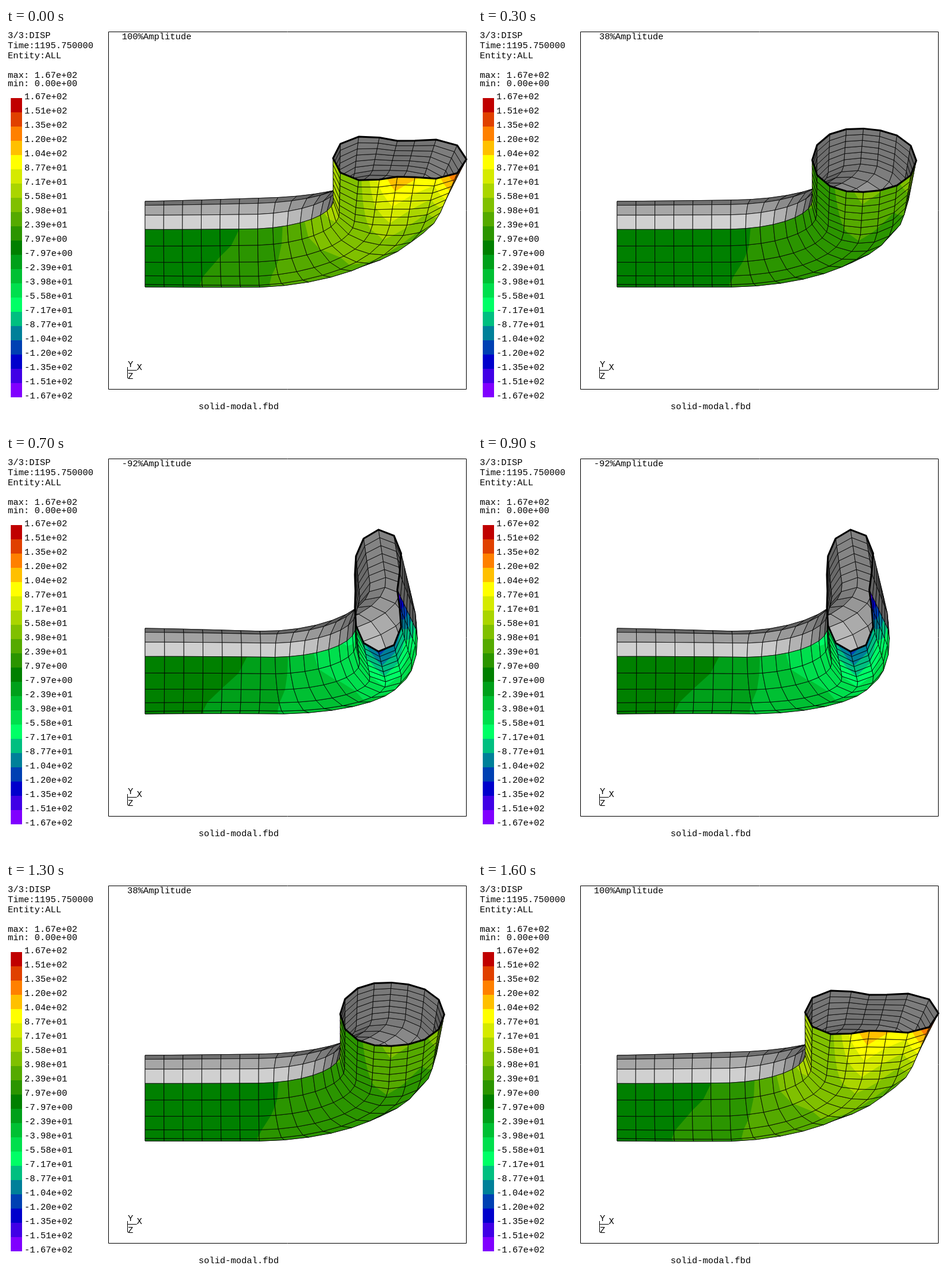
Animation of 784 by 672 pixels, one loop 1.7 s. Source, as an HTML page with a canvas:

```html
<!DOCTYPE html>
<html lang="en">
<head>
<meta charset="utf-8">
<title>Modal shape</title>
<style>
  html, body { margin: 0; width: 100%; height: 100%; overflow: hidden; background: #fff; }
  canvas { display: block; }
</style>
</head>
<body>
<canvas id="stage" width="784" height="672"></canvas>
<script>
const ctx = document.getElementById('stage').getContext('2d');
const { PI, sin, cos, hypot, abs, floor, round } = Math;

const MAX = 167.35, BANDS = 21, STEP = 2 * MAX / BANDS;
const UNITS_PER_PX = 2.65;
const TILT = 20 * PI / 180, ST = sin(TILT), CT = cos(TILT);
const R = 72.2, BEND = 216, LEG = 192, X0 = 234, AXIS_Y = 364;
const AROUND = 16, LEG_SEGS = 6, BEND_SEGS = 9;
const RINGS = 2 * LEG_SEGS + BEND_SEGS;
// rotation of the cross-section where the bend starts and ends
const ROT0 = 0.08, ROT1 = -0.072, ROT_RATE = (ROT0 - ROT1) / (PI / 2);

const STOPS = [
  [0, 192, 0, 0], [2, 255, 128, 0], [4, 255, 255, 0], [10, 0, 128, 0],
  [14, 0, 255, 102], [18, 0, 0, 204], [20, 128, 0, 255]
];
function bandColor(i) {
  const k = Math.max(1, STOPS.findIndex(s => s[0] >= i));
  const a = STOPS[k - 1], b = STOPS[k], f = (i - a[0]) / (b[0] - a[0]);
  return `rgb(${[1, 2, 3].map(c => round(a[c] + (b[c] - a[c]) * f))})`;
}
// palette[0] is the top of the legend
const palette = Array.from({ length: BANDS }, (_, i) => bandColor(i));

// Centre line, its displacement, and the amount of ovalling at one ring.
function section(i) {
  if (i <= LEG_SEGS) {
    const f = i / LEG_SEGS, w = 7 * f ** 1.5;
    return { x: X0 + LEG * f, w: 0, th: 0, dx: 0, dw: w,
             rot: 0.07 * f ** 0.7, oval: -4 * f, tri: 0 };
  }
  const bend = Math.min((i - LEG_SEGS) / BEND_SEGS, 1), th = bend * PI / 2;
  const s = sin(th), c = cos(th);
  const out = {
    x: X0 + LEG + BEND * s, w: BEND * (1 - c), th,
    dx: -BEND * (ROT0 * (1 - c) - ROT_RATE * (s - th * c)),
    dw: 7 + BEND * (ROT0 * s - ROT_RATE * (th * s + c - 1)),
    rot: ROT0 - ROT_RATE * th,
    oval: -4 + 27 * bend ** 1.5, tri: 0
  };
  const f = (i - LEG_SEGS - BEND_SEGS) / LEG_SEGS;
  if (f > 0) {
    out.w += LEG * f;
    out.dx -= ROT1 * LEG * f;
    out.oval += 17 * f;
    out.tri = 3 * f;
  }
  return out;
}

function project(x, u, w) {
  return [x, -(CT * u + ST * w), CT * w - ST * u];
}

function node(i, j) {
  const c = section(i), phi = 2 * PI * j / AROUND;
  const ox = sin(c.th), ow = -cos(c.th);
  const q = R * cos(phi);
  const rad = c.oval * cos(2 * phi) + c.tri * cos(3 * phi);
  const tan = -c.oval / 2 * sin(2 * phi) - c.tri / 3 * sin(3 * phi);
  const inPlane = rad * cos(phi) - tan * sin(phi);
  const du = rad * sin(phi) + tan * cos(phi);
  const dx = c.dx + inPlane * ox - 0.5 * c.rot * q * ow;
  const dw = c.dw + inPlane * ow + 0.5 * c.rot * q * ox;
  return {
    p: project(c.x + q * ox, R * sin(phi), c.w + q * ow),
    d: project(dx, du, dw),
    val: UNITS_PER_PX * hypot(dx, du, dw)
  };
}

const mesh = Array.from({ length: RINGS + 1 }, (_, i) =>
  Array.from({ length: AROUND }, (_, j) => node(i, j)));

function pose(n, a) {
  return {
    x: n.p[0] + a * n.d[0],
    y: AXIS_Y + n.p[1] + a * n.d[1],
    z: n.p[2] + a * n.d[2],
    v: a * n.val
  };
}

function trace(pts) {
  ctx.beginPath();
  pts.forEach(p => ctx.lineTo(p.x, p.y));
  ctx.closePath();
}

// Part of a polygon whose value is at least t.
function above(pts, t) {
  const res = [];
  pts.forEach((p, k) => {
    const q = pts[(k + 1) % pts.length];
    if (p.v >= t) res.push(p);
    if ((p.v >= t) !== (q.v >= t)) {
      const f = (t - p.v) / (q.v - p.v);
      res.push({ x: p.x + (q.x - p.x) * f, y: p.y + (q.y - p.y) * f, v: t });
    }
  });
  return res;
}

const level = v => Math.max(0, Math.min(BANDS - 1, floor((v + MAX) / STEP)));

function fillBands(pts) {
  const vals = pts.map(p => p.v);
  const lo = level(Math.min(...vals)), hi = level(Math.max(...vals));
  for (let b = lo; b <= hi; b++) {
    trace(b === lo ? pts : above(pts, -MAX + b * STEP));
    ctx.fillStyle = palette[BANDS - 1 - b];
    ctx.fill();
  }
}

function makeFace(pts, j) {
  const [A, B, C, D] = pts;
  const ax = C.x - A.x, ay = C.y - A.y, az = C.z - A.z;
  const bx = D.x - B.x, by = D.y - B.y, bz = D.z - B.z;
  const nx = ay * bz - az * by, ny = az * bx - ax * bz, nz = ax * by - ay * bx;
  return {
    pts,
    depth: A.z + B.z + C.z + D.z,
    colored: nz > 0 && j >= AROUND / 2,
    gray: round(71 + 160 * abs(nz) / hypot(nx, ny, nz))
  };
}

function drawPipe(a) {
  const g = mesh.map(ring => ring.map(n => pose(n, a)));
  const faces = [];
  for (let i = 0; i < RINGS; i++) {
    for (let j = 0; j < AROUND; j++) {
      const k = (j + 1) % AROUND;
      faces.push(makeFace([g[i][j], g[i + 1][j], g[i + 1][k], g[i][k]], j));
    }
  }
  faces.sort((p, q) => p.depth - q.depth);
  ctx.strokeStyle = '#000';
  ctx.lineJoin = 'round';
  ctx.lineWidth = 0.8;
  for (const f of faces) {
    if (f.colored) fillBands(f.pts);
    else {
      trace(f.pts);
      ctx.fillStyle = `rgb(${f.gray},${f.gray},${f.gray})`;
      ctx.fill();
    }
    trace(f.pts);
    ctx.stroke();
  }
  trace(g[RINGS]);
  ctx.lineWidth = 3;
  ctx.stroke();
}

function text(s, x, y) {
  ctx.fillText(s, x, y);
}

function sci(v) {
  return v.toExponential(2).replace(/e([+-])(\d)$/, 'e$10$2');
}

function line(x1, y1, x2, y2) {
  ctx.beginPath();
  ctx.moveTo(x1, y1);
  ctx.lineTo(x2, y2);
  ctx.stroke();
}

function drawPanel(a) {
  palette.forEach((c, i) => {
    ctx.fillStyle = c;
    ctx.fillRect(8, 118 + 24 * i, 19, 24);
  });
  ctx.fillStyle = ctx.strokeStyle = '#000';
  ctx.font = '15px "Liberation Mono", monospace';
  text('3/3:DISP', 3, 17);
  text('Time:1195.750000', 3, 34);
  text('Entity:ALL', 3, 51);
  text('max: ' + sci(MAX), 3, 84);
  text('min: ' + sci(0), 3, 98);
  for (let i = 0; i <= BANDS; i++) text(sci(MAX - i * STEP), 31, 120 + 24 * i);
  text(String(round(a * 100)).padStart(4) + '%Amplitude', 186, 19);
  text('solid-modal.fbd', 324, 642);
  text('Y', 205, 571);
  text('X', 220, 576);
  text('Z', 205, 591);
  ctx.lineWidth = 1;
  line(204.5, 571, 204.5, 590);
  line(204, 576.5, 220, 576.5);
  ctx.strokeRect(172.5, 6.5, 602, 601.99);
}

function draw(a) {
  ctx.fillStyle = '#fff';
  ctx.fillRect(0, 0, 784, 672);
  drawPipe(a);
  drawPanel(a);
}

const start = performance.now();
let shown = -1;
function tick() {
  const step = floor(((performance.now() - start) % 1700) / 100);
  if (step !== shown) {
    shown = step;
    draw(cos(PI * step / 8));
  }
  requestAnimationFrame(tick);
}
tick();
</script>
</body>
</html>
```
